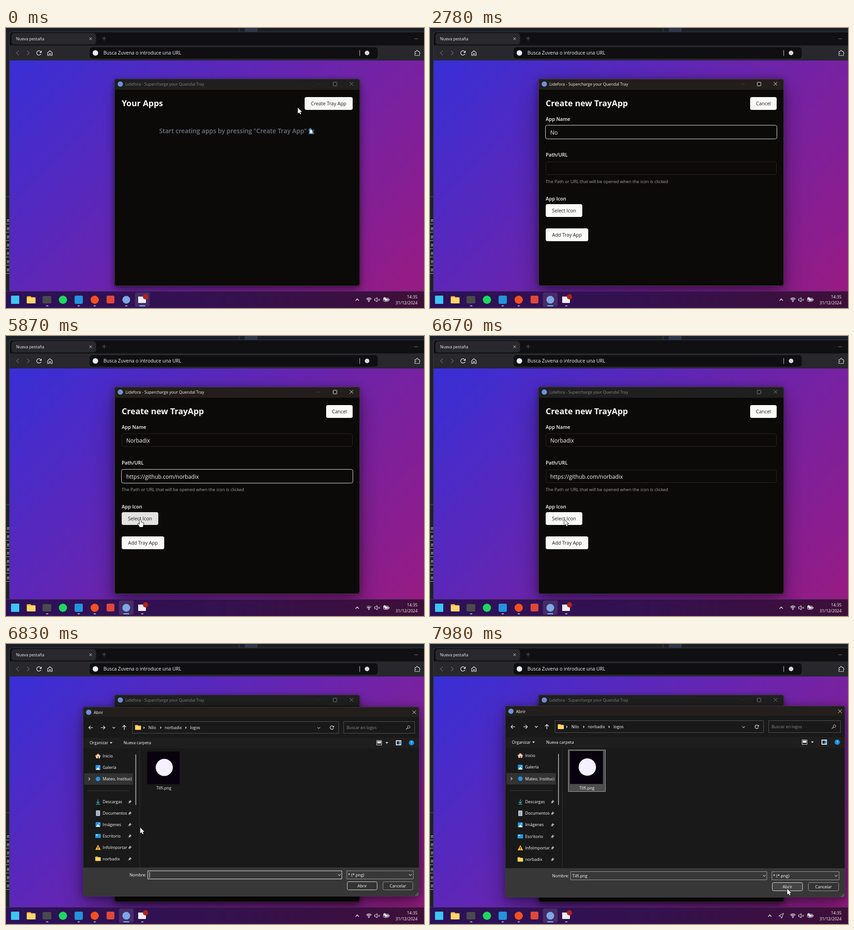
These frames come from a looping animation (914x612 px, 8 s). An HTML page with a canvas:

```html
<!DOCTYPE html>
<html lang="es">
<head>
<meta charset="utf-8">
<style>
  html, body { margin: 0; width: 100%; height: 100%; overflow: hidden; background: #1d2329; }
  canvas { display: block; }
</style>
</head>
<body>
<canvas id="stage" width="914" height="612"></canvas>
<script>
const LOOP = 8000;
const stage = document.getElementById('stage').getContext('2d');
const layer = new OffscreenCanvas(914, 612).getContext('2d');
let g = stage;

const NAME = 'Norbadix', URL_TEXT = 'https://github.com/norbadix', FILE = 'Tilfi.png';
const BUTTONS = {
  create: [653, 151, 105, 28], cancel: [700, 151, 58, 28],
  icon: [253, 385, 80, 28], add: [253, 438, 93, 28],
};
const FIELDS = [[253, 213, 505, 29], [253, 292, 505, 29]];

// Pointer waypoints: time, x, y
const POINTER = [
  [290, 638, 174], [610, 673, 172], [1430, 673, 172], [1590, 429, 230], [1830, 421, 230],
  [3960, 421, 230], [4530, 345, 308], [5360, 345, 308], [5870, 293.5, 401], [7010, 293.5, 401],
  [7300, 341, 283], [7520, 341, 283], [7930, 726, 503], [7950, 757, 521], [7980, 781, 535],
];

const fade = (t, from, to) => Math.min(1, Math.max(0, (t - from) / (to - from)));
const smooth = p => p * p * (3 - 2 * p);
const inside = (p, [x, y, w, h]) => p.x >= x && p.x < x + w && p.y >= y && p.y < y + h;

function pointerAt(t) {
  const i = POINTER.findIndex(k => k[0] > t);
  if (i === 0) return { x: POINTER[0][1], y: POINTER[0][2] };
  if (i < 0) return { x: POINTER.at(-1)[1], y: POINTER.at(-1)[2] };
  const a = POINTER[i - 1], b = POINTER[i], p = smooth(fade(t, a[0], b[0]));
  return { x: a[1] + (b[1] - a[1]) * p, y: a[2] + (b[2] - a[2]) * p };
}

function rect(x, y, w, h, fill, r = 0, stroke) {
  g.beginPath();
  g.roundRect(x, y, w, h, r);
  if (fill) { g.fillStyle = fill; g.fill(); }
  if (stroke) {
    g.beginPath();
    g.roundRect(x + .5, y + .5, w - 1, h - 1, r);
    g.strokeStyle = stroke; g.lineWidth = 1; g.stroke();
  }
}
function disc(x, y, r, fill) {
  g.beginPath(); g.arc(x, y, r, 0, 7);
  g.fillStyle = fill; g.fill();
}
function trace(points) {
  g.beginPath();
  for (let i = 0; i < points.length; i += 2) g.lineTo(points[i], points[i + 1]);
}
function line(color, width, ...points) {
  trace(points);
  g.strokeStyle = color; g.lineWidth = width; g.stroke();
}
function poly(fill, ...points) {
  trace(points);
  g.closePath(); g.fillStyle = fill; g.fill();
}
function arc(x, y, r, from, to, color, width = 1) {
  g.beginPath(); g.arc(x, y, r, from, to);
  g.strokeStyle = color; g.lineWidth = width; g.stroke();
}
// y is the middle of the capitals
function text(s, x, y, size, color, weight = 400, align = 'left') {
  g.font = `${weight} ${size}px "Open Sans", "Noto Sans", sans-serif`;
  g.textAlign = align; g.fillStyle = color;
  g.fillText(s, x, y + size * .357);
}
function gradient(x0, y0, x1, y1, ...colors) {
  const fill = g.createLinearGradient(x0, y0, x1, y1);
  colors.forEach((c, i) => fill.addColorStop(i / (colors.length - 1), c));
  return fill;
}
// A wide soft layer and a tight one, drawn only outside the window
function shadow(x, y, w, h, spread, alpha) {
  g.save();
  g.beginPath(); g.rect(0, 0, 914, 575); g.roundRect(x, y, w, h, 6); g.clip('evenodd');
  g.shadowColor = `rgba(0,0,0,${alpha})`;
  for (const [blur, drop] of [[spread, spread / 2], [spread / 3, 2]]) {
    g.shadowBlur = blur; g.shadowOffsetY = drop;
    rect(x, y, w, h, '#000', 6);
  }
  g.restore();
}
const cross = (x, y, r, c) => { line(c, 1, x - r, y - r, x + r, y + r); line(c, 1, x - r, y + r, x + r, y - r); };
const chevron = (x, y, c, dx = 3, dy = 3) => line(c, 1.1, x - dx, y - dy / 2, x, y + dy / 2, x + dx, y - dy / 2);
const chevronRight = (x, y, c, r = 2) => line(c, 1.2, x - r / 2, y - r, x + r / 2, y, x - r / 2, y + r);
const caretDown = (x, y) => poly('#ddd', x - 3, y - 1.5, x + 3, y - 1.5, x, y + 2);
function folder(x, y, s) {
  rect(x - 6 * s, y - 5 * s, 6 * s, 4 * s, '#e2a32b', s);
  rect(x - 6 * s, y - 3.4 * s, 12 * s, 8.4 * s, '#ffd566', s);
}
function refresh(x, y, r, c) {
  arc(x, y, r, .3, 5.4, c, 1.3);
  poly(c, x + r + 1, y - r - .5, x + r + 1, y - .5, x + 1, y - .5);
}

function drawDesktop() {
  rect(0, 0, 914, 612, '#1d2329');
  rect(0, 0, 914, 8, '#1b2028');
  rect(509, 0, 1, 8, '#3a414b');
  rect(522, 0, 28, 8, '#2d374a');
  rect(0, 368, 8, 1, '#4a5058');
  for (let y = 420; y <= 528; y += 18) {
    g.font = '10px "Liberation Mono", monospace';
    g.textAlign = 'left'; g.fillStyle = '#c4c8cc';
    g.fillText('m', 2, y + 4);
    rect(0, y + 8, 7, 1, '#a8acb0');
  }

  rect(7, 8, 910, 570, '#3a3a40', 6);
  rect(8, 9, 910, 30, '#101013', [6, 0, 0, 0]);
  rect(12, 11, 185, 25, '#28282d', 6);
  text('Nueva pestaña', 22, 23.5, 8.9, '#f2f2f4');
  cross(185, 23.5, 2.8, '#ddd');
  line('#66666c', 1, 210, 23, 219, 23); line('#66666c', 1, 214.5, 18.5, 214.5, 27.5);
  line('#77777c', 1, 893, 23.5, 901, 23.5);
  rect(8, 38, 906, 33, '#27272c');
  line('#66666c', 1.2, 28, 49.5, 23, 54.5, 28, 59.5);
  line('#66666c', 1.2, 46, 49.5, 51, 54.5, 46, 59.5);
  refresh(72, 54.5, 4.8, '#eee');
  line('#eee', 1.2, 91, 54, 91, 60, 94.5, 60, 94.5, 56, 97.5, 56, 97.5, 60, 101, 60, 101, 54, 96, 49.5, 91, 54);
  rect(183, 42, 630, 25, '#0f0f12', 6);
  disc(195.5, 54.5, 6, '#e8f0fe');
  text('Busca Zuvena o introduce una URL', 213, 54.5, 10.5, '#f6f6f8');
  rect(773, 48, 1, 13, '#ccc');
  disc(789.5, 54.5, 5, '#d8d8dc');
  line('#ddd', 1.1, 894, 51.5, 897, 51.5, 897.5, 49, 900.5, 49, 901, 51.5, 904, 51.5, 904, 54, 905.5, 55, 904, 57, 904, 60, 894, 60, 894, 57, 896, 55.5, 894, 54, 894, 51.5);
  rect(8, 71, 906, 505, gradient(8, 71, 713, 776, '#382fd6', '#6a24ad', '#981b82'));
}

function drawTaskbar(t) {
  rect(0, 575, 914, 37, gradient(0, 0, 914, 0, '#2c1159', '#34114f', '#3e0f38'));
  rect(0, 575, 914, 1, '#4c2a66');
  const swap = fade(t, 790, 940);
  for (const [x, on] of [[263, swap], [298, 1 - swap]]) {
    rect(x - 16, 578, 32, 31, `rgba(255,255,255,${.11 * on})`, 4);
  }
  rect(11, 585, 18, 18, '#3fc4f6', 1);
  folder(55, 594, 1.6);
  rect(80, 586, 19, 16, '#4a4a4c', 2);
  disc(124.5, 594, 9, '#1ed760');
  rect(150, 585, 18, 18, '#2394dc', 3);
  disc(194, 594, 9, '#f5501f');
  rect(220, 585, 17, 17, '#e0483a', 3);
  disc(263, 594, 8.5, '#7fa6e6');
  rect(289, 587, 17, 14, '#eeeef0', 1);
  disc(305, 587.5, 5.8, '#b3221b');
  for (const x of [90, 159, 194, 263, 298]) {
    const on = x === 263 ? swap : x === 298 ? 1 - swap : 0, w = 5 + 8 * on;
    rect(x - w / 2, 606, w, 2.4, on > .5 ? '#5cbcf2' : '#a79fb2', 1.2);
  }

  const located = t >= 7950, white = '#f8f5fa', dim = '#8d7a94', x = located ? 743 : 768;
  line(white, 1.3, x - 3.5, 596, x, 592, x + 3.5, 596);
  if (located) {
    line(white, 1, 762.5, 594.5, 773, 588.5, 769, 599.5, 767.2, 595.5, 762.5, 594.5);
  }
  const weak = t >= 4900 && t < 6100;
  [3, 5.2, 7.6].forEach((r, i) => arc(793.5, 597.5, r, -2.4, -.74, weak && i > 1 ? dim : white, 1.2));
  disc(793.5, 597.5, 1.3, white);
  line(white, 1, 806, 592, 808.5, 592, 811.5, 589, 811.5, 599, 808.5, 596, 806, 596, 806, 592);
  cross(815.5, 594, 2, white);
  rect(825, 590, 12, 8, null, 2, white);
  rect(828, 592, 7, 4, white);
  rect(837, 592.5, 1.3, 3, white);
  disc(828, 591, 2.6, white);
  text('14:35', 900, 587.5, 9.1, white, 400, 'right');
  text('31/12/2024', 900, 600.5, 9.1, white, 400, 'right');
}

function button(box, label, pointer) {
  rect(...box, pointer && inside(pointer, box) ? '#e2e2e0' : '#fafaf9', 4);
  text(label, box[0] + box[2] / 2, box[1] + box[3] / 2, 10.5, '#1c1917', 500, 'center');
}
function field(box, value, focused) {
  const [x, y, w, h] = box;
  if (focused) rect(x - 1, y - 1, w + 2, h + 2, null, 4, '#e7e5e4');
  else rect(...box, null, 4, '#292524');
  text(value, 263, y + 15.5, 12, '#fafaf9');
}

function drawApp(t, pointer) {
  const active = t >= 790 && t < 6660;
  const focus = fade(t, 790, 990) * (1 - fade(t, 6660, 6860));
  shadow(237, 111, 537, 453, 25 + 25 * focus, .35);
  rect(237, 111, 537, 453, '#0c0a09', 6);
  rect(237, 111, 537, 24, active ? '#231e1b' : '#1f1f1f', [6, 6, 0, 0]);
  rect(237, 111, 537, 453, null, 6, active ? '#4a3f4c' : '#3b373b');
  const ink = active ? '#f5f5f5' : '#858585';
  disc(250, 122.5, 5.8, '#6f93dc');
  text('Lidefora - Supercharge your Quendal Tray', 261, 123, 8.9, ink);
  line(active ? '#45413f' : '#2c2a2a', 1, 680, 122.5, 688, 122.5);
  rect(715, 118, 9, 9, null, 1, ink);
  cross(755.5, 122, 3.8, ink);

  const hover = t < 6660 && pointer;
  if (t < 890) {
    text('Your Apps', 253, 165, 18, '#fafaf9', 700);
    button(BUTTONS.create, 'Create Tray App', hover);
    text('Start creating apps by pressing "Create Tray App"', 335, 225.5, 13.7, '#6b7280', 600);
    poly('#2e8fd0', 662, 232, 672, 232, 671, 225, 663, 225);
    poly('#3aa0e0', 661, 224, 671, 224, 665, 218);
    rect(664, 223, 6, 7, '#f0e6dc', 2);
    rect(672, 221, 1.3, 11, '#9a6a3a');
    return;
  }
  text('Create new TrayApp', 253, 165, 18, '#fafaf9', 700);
  button(BUTTONS.cancel, 'Cancel', hover);
  const typed = t < 2530 ? 0 : 1 + Math.max(0, Math.floor((t - 2780) / 111.5) + 1);
  text('App Name', 253, 199, 10.6, '#fafaf9', 600);
  field(FIELDS[0], NAME.slice(0, typed), t >= 2000 && t < 4600);
  text('Path/URL', 253, 277.5, 10.6, '#fafaf9', 600);
  field(FIELDS[1], t >= 4860 ? URL_TEXT : '', t >= 4600 && t < 6320);
  text('The Path or URL that will be opened when the icon is clicked', 253, 335.5, 9.6, '#a8a29e');
  text('App Icon', 253, 373, 10.6, '#fafaf9', 600);
  button(BUTTONS.icon, 'Select Icon', hover);
  button(BUTTONS.add, 'Add Tray App', hover);
}

// Controls that have not been painted yet show as white blocks
function drawBlankDialog() {
  rect(164, 157.5, 744, 331, '#fff');
  rect(165, 225, 121, 263, '#191919');
  rect(278, 238, 1.6, 113, '#9a9a9a');
  for (const [x, y, w, h] of [[264, 498, 37, 12], [306, 496, 429, 18], [744, 496, 148, 18],
    [744, 519, 70, 20], [823, 519, 69, 20], [892, 539, 16, 14]]) rect(x, y, w, h, '#fff');
}

function sideIcon(i, y) {
  const x = 197.5;
  if (i === 0) { poly('#d8d8d8', x - 5, y, x, y - 5, x + 5, y, x + 4, y + 5, x - 4, y + 5); line('#e8863a', 1.6, x - 6, y, x, y - 5, x + 6, y); rect(x - 1, y + 1, 3, 4, '#b0602a'); }
  else if (i === 1 || i === 5) { rect(x - 5.5, y - 5.5, 11, 11, '#2b8fe0', 2); poly('#e8f4ff', x - 5, y + 5, x, y - 1, x + 5, y + 5); disc(x + 2.5, y - 2.5, 1, '#fff'); }
  else if (i === 2) disc(x, y, 5, '#2a8fe6');
  else if (i === 3) { line('#2fb5a5', 1.4, x, y - 5, x, y + 3); line('#2fb5a5', 1.4, x - 3.5, y, x, y + 3.5, x + 3.5, y); line('#2fb5a5', 1.4, x - 4.5, y + 5.5, x + 4.5, y + 5.5); }
  else if (i === 4) { rect(x - 4.5, y - 6, 9, 12, '#c3ccd6', 1); for (const d of [-3, 0, 3]) rect(x - 2.5, y + d - .5, 5, 1, '#63758a'); }
  else if (i === 6) { rect(x - 6, y - 4.5, 12, 9, '#1f9be0', 1); rect(x - 4.5, y - 3, 4, 2, '#bfe8ff'); }
  else if (i === 7) { poly('#fcb92c', x, y - 6, x + 6, y + 5.5, x - 6, y + 5.5); rect(x - .7, y - 2, 1.4, 4, '#222'); rect(x - .7, y + 3, 1.4, 1.4, '#222'); }
  else folder(x, y, 1);
}

function drawDialogContent(t, pointer) {
  const ink = '#fff', chosen = t >= 7420;
  rect(164, 157, 744, 333, '#191919');
  rect(164, 203, 744, 24, '#1e1e1e');
  line(ink, 1.1, 186, 181, 177, 181); line(ink, 1.1, 181, 177, 177, 181, 181, 185);
  line(ink, 1.1, 204, 181, 213, 181); line(ink, 1.1, 209, 177, 213, 181, 209, 185);
  chevron(232.5, 181, ink);
  line(ink, 1.2, 255.5, 186, 255.5, 176); line(ink, 1.2, 251.5, 180, 255.5, 176, 259.5, 180);
  rect(273, 167, 457, 27, '#191919', 0, '#555');
  folder(286, 180.5, 1.1);
  for (const x of [299, 336, 391.5]) chevronRight(x, 181, ink);
  text('Nilo', 309, 181, 9, ink);
  text('norbadix', 345, 181, 9, ink);
  text('logos', 401, 181, 9, ink);
  chevron(685.5, 181.5, '#bbb');
  refresh(714.5, 181, 3.8, '#ddd');
  rect(740, 167, 158, 27, '#191919', 0, '#555');
  text('Buscar en logos', 747, 181, 9, '#8c8c8c');
  arc(884.5, 179.5, 2.8, 0, 7, '#ccc'); line('#ccc', 1.1, 882.5, 181.5, 878.5, 185);

  text('Organizar', 179, 214.5, 9, ink);
  caretDown(226.5, 214.5);
  text('Nueva carpeta', 254, 214.5, 9, ink);
  rect(813, 209, 12, 11, null, 0, '#ddd'); rect(815, 211, 8, 5, '#eee');
  caretDown(836, 214.5);
  rect(856, 209, 12, 11, '#eee'); rect(858, 211, 5, 7, '#222'); rect(863, 211, 4, 7, '#2b9be0');
  disc(890.5, 214.5, 6, '#1287d8');
  text('?', 890.5, 214.5, 9, '#fff', 600, 'center');

  rect(167, 282, 108, 25, '#333');
  chevronRight(178, 294.5, '#ddd', 3);
  rect(173, 320, 95, 1, '#3c3c3c');
  ['Inicio', 'Galería', 'Mateo, Instituci', 'Descargas', 'Documentos', 'Imágenes', 'Escritorio',
    'InfoImportar', 'norbadix'].forEach((label, i) => {
    const y = 244 + 25.2 * (i + (i > 2));
    sideIcon(i, y);
    g.save();
    g.beginPath(); g.rect(160, y - 12, (i > 2 ? 263 : 275) - 160, 24); g.clip();
    text(label, 208, y, 9, ink);
    g.restore();
    if (i > 2) {
      line('#aaa', 1, 264, y + 4, 267, y + 1);
      poly('#b4b4b4', 268, y - 4, 272, y, 269, y + 1, 268.5, y + 4, 264.5, y, 267, y - 1);
    }
  });
  rect(280, 240, 2, 112, '#9a9a9a', 1);
  rect(289, 227, 1, 263, '#303030');

  const tile = [302, 231, 82, 92];
  if (chosen) rect(...tile, '#4d4d4d', 0, '#a6a6a6');
  else if (t > 7100 && inside(pointer, tile)) rect(...tile, '#333');
  rect(306, 234, 72, 72, '#07020d');
  disc(344, 269, 19, '#f4f0ff');
  text(FILE, 343, 315, 9, ink, 400, 'center');

  text('Nombre:', 304, 506.5, 9, ink, 400, 'right');
  rect(307, 497, 430, 19, '#383838', 0, chosen ? '#a0a0a0' : '#eee');
  if (chosen) text(FILE, 311, 507, 9, ink);
  else rect(311, 500, 1, 13, '#eee');
  chevron(731, 506.5, '#bbb');
  rect(747, 497, 148, 19, '#383838', 0, '#a0a0a0');
  text('* (*.png)', 750, 506.5, 9, ink);
  chevron(888, 506.5, '#bbb');
  const open = [748, 521, 67, 19];
  rect(...open, inside(pointer, open) ? '#454545' : '#333', 3, '#dcdcdc');
  text('Abrir', 781.5, 530.5, 9, ink, 400, 'center');
  rect(827, 521, 67, 19, '#333', 3, '#9a9a9a');
  text('Cancelar', 860.5, 530.5, 9, ink, 400, 'center');
  for (let i = 0; i < 3; i++) for (let j = 0; j <= i; j++) rect(904 - j * 2.5, 546 + i * 2.5, 1.3, 1.3, '#aaa');
}

function drawDialog(t, pointer) {
  const age = t - 6690;
  if (age < 0) return;
  const scale = 1 - .106 * Math.exp(-age / 62), alpha = Math.min(1, age / 47.6);
  const w = 744 * scale, h = 419 * scale;
  shadow(536 - w / 2, 344.5 - h / 2, w, h, 50, .35 * alpha);

  g = layer;
  g.clearRect(0, 0, 914, 612);
  g.save();
  g.translate(536, 344.5); g.scale(scale, scale); g.translate(-536, -344.5);
  rect(164, 135, 744, 419, '#373737', 6);
  rect(164, 135, 744, 23, '#231f1d', [6, 6, 0, 0]);
  disc(177, 147, 5.8, '#6f93dc');
  text('Abrir', 188, 147.5, 9, '#fff');
  cross(896.5, 147, 3.8, '#eee');
  if (age < 70) drawBlankDialog(); else drawDialogContent(t, pointer);
  rect(164, 135, 744, 419, null, 6, '#403b45');
  g.restore();
  g = stage;
  g.globalAlpha = alpha;
  g.drawImage(layer.canvas, 0, 0);
  g.globalAlpha = 1;
}

const ARROW = new Path2D('M0 0V13L3 10.3L5.1 14.8L7.2 13.8L5.2 9.5H9.2Z');
const HAND = new Path2D('M-1.4 1Q0-.8 1.4 1V6L6.5 7.2Q7.6 7.6 7.4 9L6.6 13.2L5.5 16.5H-1.5L-2.4 14L-5.2 10.4Q-5.2 8.6-3.4 9.2L-1.4 11Z');

function drawPointer(t, p) {
  if ((t >= 2200 && t < 3960) || (t >= 4860 && t < 5360)) return;
  const form = t >= 890, web = t < 6660;
  const overButton = web && (form ? [BUTTONS.cancel, BUTTONS.icon, BUTTONS.add] : [BUTTONS.create]).some(b => inside(p, b));
  const overField = web && form && FIELDS.some(b => inside(p, b));
  if (overField) {
    line('#eee', 1, p.x, p.y - 6, p.x, p.y + 6);
    line('#eee', 1, p.x - 2.5, p.y - 6.5, p.x + 2.5, p.y - 6.5);
    line('#eee', 1, p.x - 2.5, p.y + 6.5, p.x + 2.5, p.y + 6.5);
    return;
  }
  const shape = overButton ? HAND : ARROW;
  g.save();
  g.translate(p.x, p.y);
  g.strokeStyle = '#000'; g.lineWidth = 1.6; g.lineJoin = 'round'; g.stroke(shape);
  g.fillStyle = '#fff'; g.fill(shape);
  g.restore();
}

function draw() {
  const t = performance.now() % LOOP, pointer = pointerAt(t);
  drawDesktop();
  drawApp(t, pointer);
  drawDialog(t, pointer);
  drawTaskbar(t);
  drawPointer(t, pointer);
  requestAnimationFrame(draw);
}
draw();
</script>
</body>
</html>
```
